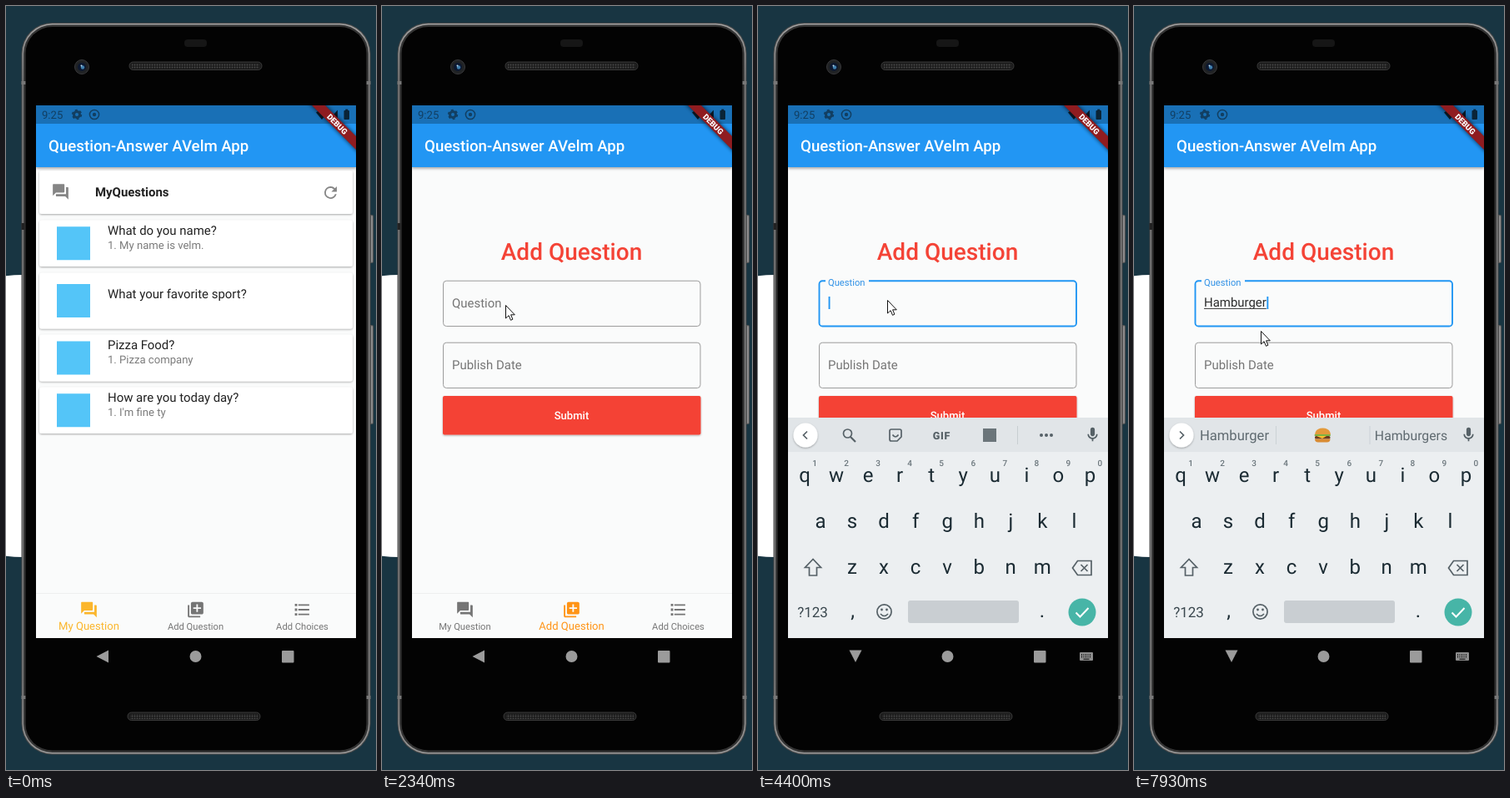
An HTML page that plays this animation: 444 px wide and 915 px high, repeating every 8 s.

```html
<!DOCTYPE html>
<html lang="en">
<head>
<meta charset="utf-8">
<title>Question app</title>
<style>
html, body { margin: 0; width: 100%; height: 100%; overflow: hidden; background: #183542; }
svg { display: block; width: 100%; height: 100%; }
text { font-family: Roboto, "Noto Sans", sans-serif; white-space: pre; text-rendering: geometricPrecision; }
.mid { text-anchor: middle; }
.key { font-size: 24px; fill: #1b2b33; text-anchor: middle; }
.hint { font-size: 10px; font-weight: 500; fill: #6c777d; text-anchor: middle; }
.line { fill: none; stroke: #566167; stroke-width: 1.7; }
</style>
</head>
<body>
<svg id="stage" viewBox="0 0 444 915"></svg>
<script>
const DP = 0.934;
const LOOP = 8000;
const GREY = '#757575', BLUE = '#2196f3', RED = '#f44336';

const icons = {
  forum: 'M21 6h-2v9H6v2c0 .55.45 1 1 1h11l4 4V7c0-.55-.45-1-1-1zm-4 6V3c0-.55-.45-1-1-1H3c-.55 0-1 .45-1 1v14l4-4h10c.55 0 1-.45 1-1z',
  refresh: 'M17.65 6.35A7.96 7.96 0 0 0 12 4a8 8 0 1 0 7.73 10h-2.08A6 6 0 1 1 12 6c1.66 0 3.14.69 4.22 1.78L13 11h7V4z',
  add: 'M4 6H2v14c0 1.1.9 2 2 2h14v-2H4zM20 2H8c-1.1 0-2 .9-2 2v12c0 1.1.9 2 2 2h12c1.1 0 2-.9 2-2V4c0-1.1-.9-2-2-2zm-1 9h-4v4h-2v-4H9V9h4V5h2v4h4z',
  list: 'M2.5 4.5h3v3h-3zM2.5 10.5h3v3h-3zM2.5 16.5h3v3h-3zM7 5h14v2H7zM7 11h14v2H7zM7 17h14v2H7z',
  mic: 'M12 14c1.66 0 3-1.34 3-3V5a3 3 0 0 0-6 0v6c0 1.66 1.34 3 3 3zm5-3a5 5 0 0 1-10 0H5c0 3.53 2.61 6.43 6 6.92V21h2v-3.08c3.39-.49 6-3.39 6-6.92z'
};

const icon = (name, x, y, fill, id = '', scale = DP) =>
  `<path ${id && `id="${id}"`} d="${icons[name]}" fill="${fill}" transform="translate(${x} ${y}) scale(${scale}) translate(-12 -12)"/>`;
const text = (s, x, y, size, fill, extra = '') =>
  `<text x="${x}" y="${y}" font-size="${size}" fill="${fill}" ${extra}>${s}</text>`;
const rect = (x, y, w, h, fill, extra = '') =>
  `<rect x="${x}" y="${y}" width="${w}" height="${h}" fill="${fill}" ${extra}/>`;
const circle = (x, y, r, fill, extra = '') =>
  `<circle cx="${x}" cy="${y}" r="${r}" fill="${fill}" ${extra}/>`;

const card = (y, h) => rect(40, y, 376, h, '#fff', 'rx="3" filter="url(#shadow)"');

function phone() {
  const speaker = (x, y) =>
    rect(x, y, 159, 9.5, '#1c1c1c', 'rx="4.5" stroke="#444" stroke-width=".8"') +
    rect(x + 3, y + 2, 153, 6, 'url(#mesh)');
  const shell = (inset, fill) =>
    rect(18.5 + inset, 20 + inset, 419 - 2 * inset, 876.5 - 2 * inset, fill, `rx="${37 - inset}"`);
  const button = (y, h) =>
    rect(433, y, 8, h, '#565656', 'rx="2"') + rect(438, y + 1, 2, h - 2, '#8a8a8a', 'rx="1"');
  return circle(20, 491, 169, '#fff') + button(250, 58) + button(382, 119) +
    shell(0, '#4a4a4a') + shell(1, 'url(#metal)') + shell(2.6, '#343434') +
    [90, 826].map(y => rect(18.5, y, 419, 4, '#777')).join('') +
    rect(18.5, 260, 4, 8, '#222') + shell(5, '#030303') +
    rect(214, 40, 27, 9, '#161616', 'rx="4"') +
    circle(91, 73, 8.5, '#202224', 'stroke="#39393b"') +
    circle(91, 73, 5, '#0c1830') + circle(92, 73.5, 2.2, '#3f7fae') + circle(90.5, 71.5, 1, '#bfe0f5') +
    speaker(148, 67) + speaker(146, 846);
}

function appBar() {
  const ink = '#123f62';
  return rect(36, 141, 384, 52, BLUE, 'filter="url(#barShadow)"') +
    rect(36, 119, 384, 22, '#1970b6') +
    text('9:25', 43, 135, 13.1, ink) +
    `<circle cx="85" cy="130" r="3.5" fill="none" stroke="${ink}" stroke-width="3"/>` +
    `<circle cx="85" cy="130" r="5.3" fill="none" stroke="${ink}" stroke-width="1.8" stroke-dasharray="2.8 2.75"/>` +
    circle(106, 130, 5.6, 'none', `stroke="${ink}" stroke-width="1.5"`) + circle(106, 130, 2.2, ink) +
    `<path d="M372 127.500q7-6 14 0l-7 8.500zM388 135.500h10v-11z" fill="#0a1c2b"/>` +
    rect(405.5, 125, 6.5, 11, '#0a2437', 'rx="1"') + rect(407.3, 123.6, 3, 2, '#0a2437') +
    text('Question-Answer AVelm App', 51, 174, 18.68, '#fff', 'font-weight="500"') +
    `<g transform="translate(420 119) rotate(45)">
      ${rect(-45, 26.2, 90, 11.2, '#000', 'opacity=".75" filter="url(#blur)"')}
      ${rect(-45, 26.2, 90, 11.2, '#8f1c20')}
      ${text('DEBUG', 0, 35.2, 9.5, '#fff', 'class="mid" font-weight="900"')}
    </g>`;
}

function listPage() {
  const rows = [
    [256.5, 55.5, 'What do you name?', '1. My name is velm.'],
    [319.5, 67, 'What your favorite sport?', ''],
    [393.5, 56, 'Pizza Food?', '1. Pizza company'],
    [456.5, 55.5, 'How are you today day?', "1. I'm fine ty"]
  ];
  return card(197, 52) + icon('forum', 65.5, 222.5, '#858585') +
    text('MyQuestions', 107, 228, 14.95, '#212121', 'font-weight="700"') +
    icon('refresh', 389.5, 223.5, '#858585') +
    rows.map(([y, h, title, answer]) => card(y, h) +
      rect(61, y + h / 2 - 20, 40, 40, '#54c5f8') +
      text(title, 122, answer ? y + 17.8 : y + 30, 14.95, '#212121') +
      text(answer, 122, y + 34.2, 13.1, '#7b7b7b')).join('');
}

function formPage() {
  return text('Add Question', 227.5, 303.5, 28, RED, 'class="mid" font-weight="500"') +
    rect(73.5, 329.2, 308.5, 54.3, 'none', 'id="field" rx="3.8"') +
    rect(81, 326, 52, 6, '#fafafa', 'id="gap"') +
    text('Question', 84, 361, 14.95, GREY, 'id="label"') +
    text('', 84, 360, 14.95, '#2b2b2b', 'id="typed"') +
    rect(84, 362, 0, 1, '#444', 'id="under"') +
    rect(84.6, 348, 1.9, 15, BLUE, 'id="caret"') +
    rect(73.5, 403.2, 308.5, 54.3, 'none', 'rx="3.8" stroke="#9c9c9c"') +
    text('Publish Date', 84, 435, 14.95, GREY) +
    rect(73, 467, 309.5, 46.5, RED, 'rx="2" filter="url(#shadow)"') +
    text('Submit', 227.5, 495, 13.1, '#fff', 'class="mid" font-weight="500"');
}

function bottomNav() {
  return rect(36, 704, 384, 53, '#fafbfb') + rect(36, 703, 384, 1, '#eeefef') +
    circle(227.5, 731, 32.5, '#000', 'id="ripple" clip-path="url(#navClip)"') +
    icon('forum', 99.5, 723, GREY, 'iconA') + icon('add', 227.5, 723, GREY, 'iconB') +
    icon('list', 355.5, 723, GREY) +
    text('My Question', 99.5, 746.5, 13, GREY, 'id="navA" class="mid"') +
    text('Add Question', 227.5, 746.5, 11.2, GREY, 'id="navB" class="mid"') +
    text('Add Choices', 355.5, 746.5, 11.2, GREY, 'class="mid"');
}

function keyboard() {
  const row = (keys, x, y, hints) => [...keys].map((k, i) => {
    const cx = x + i * 38.05;
    return `<text class="key" x="${cx}" y="${y}">${k}</text>` +
      (hints ? `<text class="hint" x="${cx + 12}" y="551">${(i + 1) % 10}</text>` : '');
  }).join('');
  const tools = `<g class="line">
      <circle cx="107.5" cy="512" r="5"/><path d="M111 516l6 6" stroke-width="2.2"/>
      <path d="M160 507h10q2 0 2 2v7l-5 5h-7q-2 0-2-2v-10q0-2 2-2M161.5 513.5q3.5 5 7 0"/></g>
    ${text('GIF', 220.5, 518.5, 12.5, '#566167', 'class="mid" font-weight="900" letter-spacing=".8"')}
    ${rect(270, 506, 16, 16, '#6b757a')}${rect(311, 503, 1, 22, '#c8ced1')}
    ${[340, 346, 352].map(x => circle(x, 514, 2, '#566167')).join('')}`;
  const words = [120.5, 226.5, 332.5].map((x, i) =>
    text('', x, 520, 16.6, i === 1 ? '#111' : '#5f6a70',
      `id="word${i}" class="mid" font-weight="${i === 1 ? 700 : 400}"`)).join('');
  const burger = `<g id="burger">
      <path d="M217 513q1-7.5 9.5-7.5t9.5 7.5z" fill="#e39a3b"/>
      ${rect(216.5, 513, 19.5, 2, '#7cb342', 'rx="1"')}
      ${rect(217, 515, 18.5, 3.5, '#6d3b1f', 'rx="1.5"')}
      <path d="M219 515h12l-5 3z" fill="#fbc02d"/>
      <path d="M217 518.5h18.5q0 4-4 4h-10.5q-4 0-4-4" fill="#d98c34"/></g>`;
  return rect(36, 493, 384, 264, '#eceff1') + rect(36, 493, 384, 41, '#e1e5e8') +
    circle(57, 514, 14.5, '#fff', 'filter="url(#shadow)"') +
    '<path id="chevron" class="line" stroke-width="2" d="M-2 -4.5L2.5 0L-2 4.5"/>' +
    icon('mic', 401.5, 513.5, '#566167', '', 0.87) +
    `<g id="tools">${tools}</g><g id="words">${words}${burger}
      ${rect(170, 503, 1, 22, '#ccd2d5')}${rect(282.5, 503, 1, 22, '#ccd2d5')}</g>` +
    row('qwertyuiop', 56, 570, true) + row('asdfghjkl', 75, 624.5) + row('zxcvbnm', 113, 680) +
    text('?123', 65.5, 732, 17, '#3b484f', 'class="mid"') +
    '<text class="key" x="113.5" y="732">,</text><text class="key" x="341" y="732">.</text>' +
    `<g class="line"><path d="M66 662.5l-9.5 10h5v9.5h9v-9.5h5z"/>
      <path d="M377.5 673l6-8.5h16.5v17h-16.5zM387.5 669l8 8m0-8l-8 8"/>
      <circle cx="151.5" cy="725.5" r="8.6"/><path d="M147 728q4.5 5 9 0"/></g>` +
    circle(148.5, 723, 1.4, '#566167') + circle(154.5, 723, 1.4, '#566167') +
    rect(180, 712, 133, 27, '#c9ced2', 'rx="3"') + circle(389, 726, 16.5, '#47b5a7') +
    '<path d="M381.5 726.5l5 5 10-10.5" fill="none" stroke="#fff" stroke-width="2"/>';
}

function systemNav() {
  return `<g fill="#9b9b9b"><path id="back" d="M-7.5 0L7 -7.5V7.5Z"/>
    <circle cx="227.5" cy="779" r="7"/><rect x="331" y="772" width="14.5" height="14.5" rx="1"/></g>
    <g id="kbIcon"><rect x="386" y="774" width="16" height="10" rx="1" fill="#8d8d8d"/>
    <path d="M388 777h12M388 779.5h12" stroke="#050505" stroke-width="1.3" stroke-dasharray="1 1.5"/>
    <path d="M390.5 782.2h7" stroke="#050505"/></g>`;
}

const stage = document.getElementById('stage');
stage.innerHTML = `<defs>
  <linearGradient id="metal" x2="0" y2="1"><stop stop-color="#a2a2a2"/><stop offset=".08" stop-color="#7c7c7c"/>
    <stop offset=".9" stop-color="#7c7c7c"/><stop offset="1" stop-color="#9a9a9a"/></linearGradient>
  <pattern id="mesh" width="3" height="3" patternUnits="userSpaceOnUse"><circle cx="1.5" cy="1.5" r=".9" fill="#4a4a4a"/></pattern>
  <filter id="shadow" x="-10%" y="-20%" width="120%" height="150%"><feDropShadow dx="0" dy="1" stdDeviation=".8" flood-opacity=".33"/></filter>
  <filter id="barShadow" x="-2%" y="-10%" width="104%" height="140%"><feDropShadow dx="0" dy="2" stdDeviation="1.8" flood-opacity=".3"/></filter>
  <filter id="blur" x="-20%" y="-80%" width="140%" height="260%"><feGaussianBlur stdDeviation="2.5"/></filter>
  <clipPath id="screenClip"><rect x="36" y="119" width="384" height="638"/></clipPath>
  <clipPath id="navClip"><rect x="36" y="703" width="384" height="54"/></clipPath></defs>
  ${phone()}
  <g clip-path="url(#screenClip)">${rect(36, 119, 384, 638, '#fafbfb')}
    <g id="listPage">${listPage()}</g><g id="formPage">${formPage()}</g>
    ${appBar()}${bottomNav()}<g id="keyboard">${keyboard()}</g></g>
  ${systemNav()}
  <path id="cursor" d="M.5 .5V16L4.1 12.7 6.5 18.3 8.9 17.2 6.6 11.8H11.3Z" fill="#fff" stroke="#111"/>`;

const ui = {};
stage.querySelectorAll('[id]').forEach(el => { ui[el.id] = el; });
const set = (id, attrs) => { for (const k in attrs) ui[id].setAttribute(k, attrs[k]); };
const show = (id, on) => set(id, { visibility: on ? 'inherit' : 'hidden' });

const clamp = v => Math.min(1, Math.max(0, v));
const lerp = (a, b, p) => a + (b - a) * p;
const smooth = p => p * p * (3 - 2 * p);
const span = (t, from, to) => clamp((t - from) / (to - from));
const mix = (a, b, p) => `rgb(${a.map((v, i) => Math.round(lerp(v, b[i], p)))})`;
const at = (table, t) => table.filter(row => row[0] <= t).pop()[1];

const caretSteps = [[0, 0], [2950, 0.3], [3090, 0.65], [3270, 1], [3540, 0], [4070, 0.6], [4180, 1], [4940, 0], [5400, 1]];
const toolSteps = [[0, 0], [3540, 0.3], [4070, 0.6], [4180, 0.8], [4290, 0.95], [4400, 1], [5400, 0.4], [5470, 0]];
const typing = [[0, ''], [5400, 'H'], [5730, 'Ha'], [5860, 'Ham'], [6400, 'Hamb'], [6540, 'Hambu'],
  [6730, 'Hambur'], [7190, 'Hamburg'], [7390, 'Hamburge'], [7590, 'Hamburger']];
const guesses = [[0, ['', '']], [5470, ['How', 'He']], [5730, ['Have', 'Has']], [5860, ['Ham', 'Hams']],
  [6400, ['Hamburger', 'Hamburgers']], [7190, ['Hamburg', 'Hamburgers']],
  [7390, ['Hamburger', 'Hamburgers']], [7590, ['', 'Hamburgers']]];

// Pointer moves: start, end, number of steps, then cubic control points.
const moves = [
  [500, 900, 6, [240, 815], [236, 790], [225, 745], [224, 719]],
  [1640, 2340, 11, [224, 719], [225, 590], [112, 425], [148, 358]],
  [2670, 2740, 2, [148, 358], [150, 356], [153, 354], [155, 352]],
  [7860, 7930, 2, [155, 352], [155, 364], [153, 378], [152, 389]]
];

function pointer(t) {
  const move = moves.filter(m => m[0] <= t).pop();
  if (!move) return null;
  const [start, end, count, a, b, c, d] = move;
  const step = Math.floor((t - start) / (end - start) * (count - 1) + 1e-6) + 1;
  const p = smooth(clamp(step / count)), q = 1 - p;
  return [0, 1].map(i => q * q * q * a[i] + 3 * q * q * p * b[i] + 3 * q * p * p * c[i] + p * p * p * d[i]);
}

function drawNav(t) {
  const p = smooth(span(t, 1040, 1390));
  const grey = [117, 117, 117];
  const colorA = t < 1040 ? '#fbb62c' : mix([236, 125, 32], grey, span(t, 1110, 1390));
  const colorB = mix(grey, [255, 148, 22], span(t, 1110, 1390));
  set('navA', { 'font-size': lerp(13.08, 11.2, p), fill: colorA });
  set('navB', { 'font-size': lerp(11.2, 13.08, p), fill: colorB });
  set('iconA', { fill: colorA });
  set('iconB', { fill: colorB });
  set('ripple', { r: lerp(10, 32.5, span(t, 970, 1110)), opacity: t < 970 ? 0 : 0.075 * (1 - span(t, 1180, 1320)) });
}

function drawField(t) {
  const focused = t >= 2670;
  const p = smooth(span(t, 2670, 2880));
  set('field', { stroke: focused ? BLUE : '#9c9c9c', 'stroke-width': focused ? 1.9 : 1 });
  show('gap', p > 0.3);
  set('label', { y: lerp(361, 334.5, p), 'font-size': lerp(14.95, 11.2, p), fill: mix([117, 117, 117], [47, 145, 230], p) });
  const word = at(typing, t);
  if (ui.typed.textContent !== word) ui.typed.textContent = word;
  const width = word ? ui.typed.getComputedTextLength() : 0;
  set('under', { width });
  set('caret', { x: 84.6 + width, opacity: at(caretSteps, t) });
}

function drawKeyboard(t) {
  const up = t >= 2810;
  show('keyboard', up);
  show('kbIcon', up);
  set('keyboard', { transform: `translate(0 ${264 * (1 - smooth(span(t, 2740, 2950)))})` });
  set('back', { transform: up ? 'translate(117 778.5) rotate(-90)' : 'translate(116 779)' });
  const open = at(toolSteps, t);
  set('tools', { opacity: open, transform: `translate(${-25 * (1 - open)} 0)` });
  set('chevron', { transform: `translate(57 514) rotate(${180 * open})` });
  show('words', t >= 5470);
  show('burger', t >= 7590);
  const [middle, right] = at(guesses, t);
  [at(typing, t), middle, right].forEach((w, i) => {
    const el = ui['word' + i];
    if (el.textContent !== w) el.textContent = w;
  });
  set('word2', { 'font-size': right.length > 9 ? 15.8 : 16.6 });
}

function render(t) {
  show('listPage', t < 1040);
  show('formPage', t >= 1040);
  drawNav(t);
  drawField(t);
  drawKeyboard(t);
  const pos = pointer(t);
  show('cursor', pos);
  if (pos) set('cursor', { transform: `translate(${pos})` });
}

const start = performance.now();
function frame() {
  render((performance.now() - start) % LOOP);
  requestAnimationFrame(frame);
}
frame();
</script>
</body>
</html>
```
